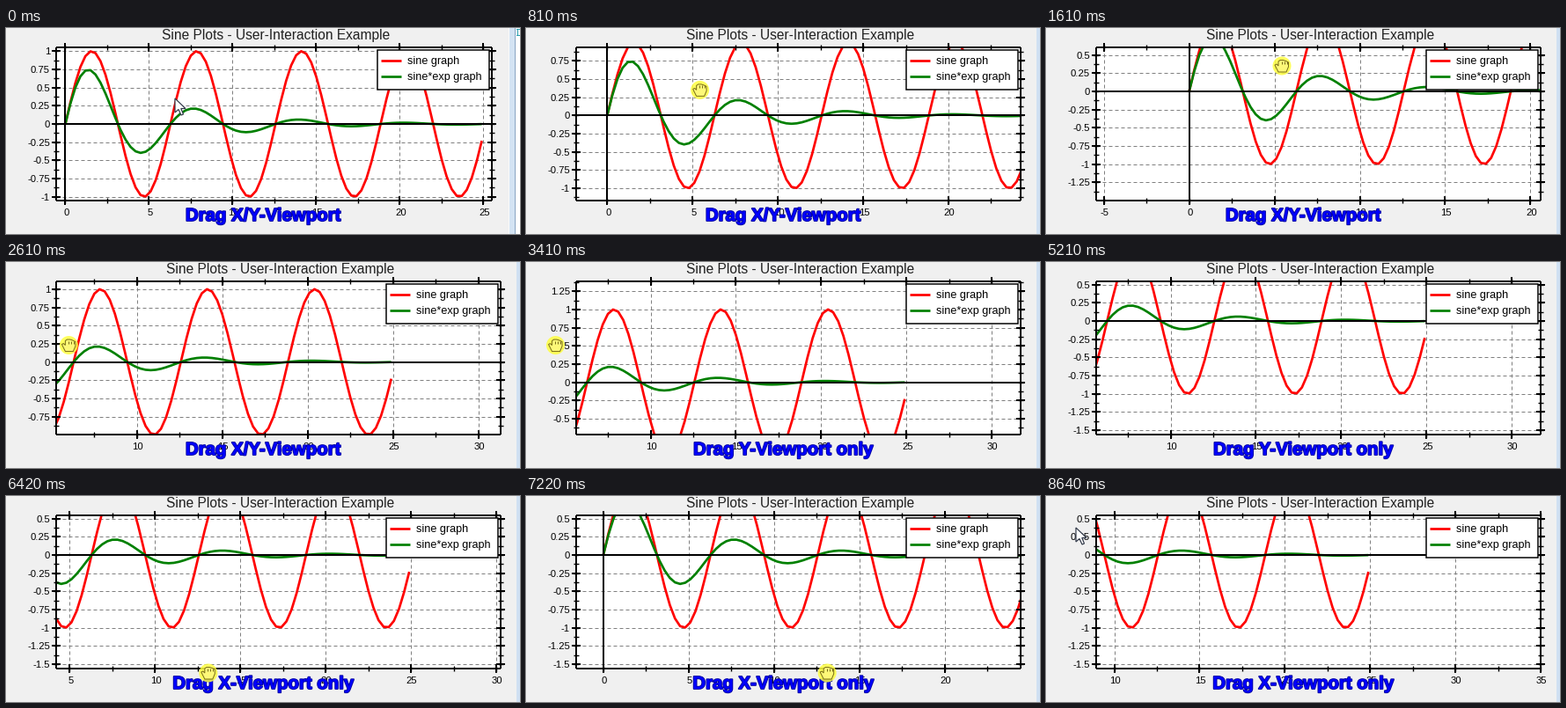
A matplotlib script that plays this animation: 584 px wide and 234 px high, repeating every 9.05 s.

```python
import numpy as np
import matplotlib.pyplot as plt
from matplotlib import patheffects
from matplotlib.animation import FuncAnimation
from matplotlib.patches import Circle, Polygon, Rectangle

W, H, DPI = 584, 234, 100
LOOP, TICK, STEPS = 9050, 50, 45
TOP, BOTTOM = 22, 196
X_RANGE, Y_SCALE = 26.05, 82.7
X_START, Y_START, DRAG_SCALE = -0.55, 109, 19.386

# Pointer waypoints: step, x, y, and what the pointer does from there on
PATH = (
    (0, 192, 80, "move"),
    (2, 173, 80, "drag xy"),
    (8, 268, 43, "move"),
    (9, 279, 53, "drag xy"),
    (13.5, 64, 96, "move"),
    (16, 32, 73, "drag y"),
    (20, 42, 211, "drag y"),
    (25, 8, 25, "away"),
    (28.9, 24, 206, "move"),
    (31, 202, 201, "drag x"),
    (35, 380, 201, "drag x"),
    (39, 138, 201, "move"),
    (43, 34, 36, "move"),
)

ARROW = np.array([(0, 0), (0, 16), (4, 12.5), (7, 19), (9.5, 18),
                  (6.8, 11.5), (12, 11.5)])
FIST = np.array([(-4, 7), (-8, -1), (-6, -2), (-4, 0), (-4, -5), (-2, -6.5),
                 (1.5, -6.5), (4.5, -5.5), (7.5, -4), (7.5, 1), (5, 7)])

fig = plt.figure(figsize=(W / DPI, H / DPI), dpi=DPI, facecolor="#f0f0f0")
ax = fig.add_axes((0, 0, 1, 1))
ax.set_xlim(0, W)
ax.set_ylim(H, 0)
ax.axis("off")


def pt(px):
    return px * 72 / DPI


def rect(x, y, w, h, color, z, **kw):
    kw.setdefault("lw", 0)
    return ax.add_patch(Rectangle((x, y), w, h, fc=color, zorder=z, **kw))


def line(color, px, z, **kw):
    kw.setdefault("solid_capstyle", "butt")
    return ax.plot([], [], color=color, lw=pt(px), zorder=z, **kw)[0]


def label(px, z, words="", **kw):
    kw = {"color": "black", "family": "Liberation Sans", **kw}
    return ax.text(0, 0, words, fontsize=pt(px), zorder=z, va="baseline", **kw)


def segments(pairs):
    """Join separate segments into one path with gaps."""
    gap = (np.nan, np.nan)
    pts = [p for a, b in pairs for p in (a, b, gap)]
    return np.array(pts or [gap]).T


# Window edge, in its narrow and wide layout
narrow_edge = [rect(571, 0, 1, H, "#fafafa", 1),
               rect(572, 0, 6, H, "#d3e3f3", 1),
               rect(578, 0, 1, H, "#8aa5c2", 1),
               rect(579, 0, 5, H, "#ffffff", 1)]
narrow_edge += [rect(x, y, w, h, "#2a9fb0", 2) for x, y, w, h in
                ((580, 1, 4, 1), (581, 2, 1, 6), (580, 8, 4, 1))]
wide_edge = rect(580, 0, 4, H, "#cfe0f2", 1)

panel = rect(0, TOP, 1, BOTTOM - TOP, "white", 1)
grid = line("#808080", 1, 2, dashes=(4, 3))
sine = line("#ff0000", 2.7, 3)
damped = line("#008000", 2.7, 3.1)
axes_line = line("black", 2, 4)
major = line("black", 2, 5)
minor = line("black", 1.4, 5)
x_labels = [label(11.3, 6, ha="center") for _ in range(7)]
y_labels = [label(11.3, 6, ha="right") for _ in range(10)]
title = label(15.5, 6, "Sine Plots - User-Interaction Example",
              ha="center", color="#202020")

legend_box = rect(0, 25, 127, 45, "white", 7, ec="black", lw=pt(1.5))
legend = [(line(color, 2.7, 8), label(12.6, 8, name), y) for name, color, y in
          (("sine graph", "#ff0000", 37), ("sine*exp graph", "#008000", 55))]

caption = label(20.4, 10, ha="center", color="#0000ff", weight="bold")
caption.set_position((292, 219))
caption.set_path_effects([patheffects.withStroke(linewidth=pt(1.8),
                                                 foreground="#0000a0")])

arrow = ax.add_patch(Polygon(ARROW, fc="white", ec="#303848", lw=pt(1.2), zorder=12))
halo = ax.add_patch(Circle((0, 0), 10.5, fc="#ffff40", lw=0, alpha=0.85, zorder=11))
fist = ax.add_patch(Polygon(FIST, fc="#fdf878", ec="#7a6e18", lw=pt(1), zorder=12))
knuckles = line("#7a6e18", 1, 13)

xs = np.arange(84) * 0.3
sin_y = np.sin(xs)
damped_y = sin_y * np.exp(-xs / 5)


def ease(t):
    t = min(max(t, 0), 1)
    return t * t * (3 - 2 * t)


def state(step):
    """Pointer place and action, and the viewport its drags have led to."""
    xmin, y0 = X_START, Y_START
    for (s0, xa, ya, action), (s1, xb, yb, _) in zip(PATH, PATH[1:]):
        k = ease((step - s0) / (s1 - s0))
        dx, dy = k * (xb - xa), k * (yb - ya)
        if action in ("drag x", "drag xy"):
            xmin -= dx / DRAG_SCALE
        if action in ("drag y", "drag xy"):
            y0 += dy
        if step <= s1:
            break
    return xmin, y0, xa + dx, ya + dy, action


def marks(step, lo, hi):
    return np.arange(np.ceil(lo / step), np.floor(hi / step) + 1) * step


def fill_labels(pool, values, place):
    for k, text in enumerate(pool):
        shown = k < len(values)
        text.set_visible(shown)
        if shown:
            text.set_text(f"{values[k] + 0.0:g}")
            text.set_position(place(values[k]))


def draw_plot(step, xmin, y0):
    right = 552 if step == 0 else 562
    # The left margin shrinks when no label needs a minus sign
    left = 57 if y0 + Y_SCALE / 4 < BOTTOM else 52
    scale = (right - left) / X_RANGE

    def px(x):
        return left + (x - xmin) * scale

    def py(y):
        return y0 - y * Y_SCALE

    panel.set_x(left)
    panel.set_width(right - left)
    for curve, ys in ((sine, sin_y), (damped, damped_y)):
        curve.set_data(px(xs), py(ys))
        curve.set_clip_path(panel)

    xmax = xmin + X_RANGE + 0.04
    ymin, ymax = (y0 - BOTTOM + 0.2) / Y_SCALE, (y0 - TOP) / Y_SCALE
    xt, yt = marks(5, xmin, xmax), marks(0.25, ymin, ymax)

    def across(y):
        return (left, y), (right, y)

    def down(x):
        return (x, TOP), (x, BOTTOM)

    grid.set_data(segments([down(px(x)) for x in xt] + [across(py(y)) for y in yt]))
    frame = [across(TOP), across(BOTTOM), down(left), down(right)]
    if left < px(0) < right:
        frame.append(down(px(0)))
    if TOP < y0 < BOTTOM:
        frame.append(across(y0))
    axes_line.set_data(segments(frame))

    def ticks(x_vals, y_vals, r):
        pairs = [((px(x), e - r), (px(x), e + r))
                 for x in x_vals for e in (TOP, BOTTOM)]
        pairs += [((e - r, py(y)), (e + r, py(y)))
                  for y in y_vals for e in (left, right)]
        return segments(pairs)

    major.set_data(ticks(xt, yt, 5))
    minor.set_data(ticks(marks(2.5, xmin, xmax), marks(0.125, ymin, ymax), 3))
    fill_labels(x_labels, xt, lambda x: (px(x) + 1, 213))
    fill_labels(y_labels, yt, lambda y: (left - 7, py(y) + 4))

    title.set_position(((left + right) / 2 + 2.5, 13))
    legend_box.set_x(right - 130.5)
    for sample, text, y in legend:
        sample.set_data([right - 126, right - 103], [y, y])
        text.set_position((right - 96, y + 4))


def draw_pointer(x, y, action):
    arrow.set_visible(action == "move")
    for part in (halo, fist, knuckles):
        part.set_visible(action.startswith("drag"))
    arrow.set_xy(ARROW + (x, y))
    halo.center = (x, y)
    fist.set_xy(FIST + (x, y))
    knuckles.set_data(segments([((x + d, y - 5), (x + d, y - 2))
                                for d in (-0.5, 2.5, 5.5)]))


def update(i):
    # The picture advances in even steps; the clock runs finer
    step = min(int((i + 1) * TICK * STEPS / LOOP), STEPS - 1)
    xmin, y0, x, y, action = state(step)
    for part in narrow_edge:
        part.set_visible(step == 0)
    wide_edge.set_visible(step > 0)
    draw_plot(step, xmin, y0)
    draw_pointer(x, y, action)
    if step < 15:
        caption.set_text("Drag X/Y-Viewport")
    elif step < 29:
        caption.set_text("Drag Y-Viewport only")
    else:
        caption.set_text("Drag X-Viewport only")
    return []


anim = FuncAnimation(fig, update, frames=LOOP // TICK, interval=TICK,
                     repeat=True, repeat_delay=0, blit=False)
plt.show()
```
